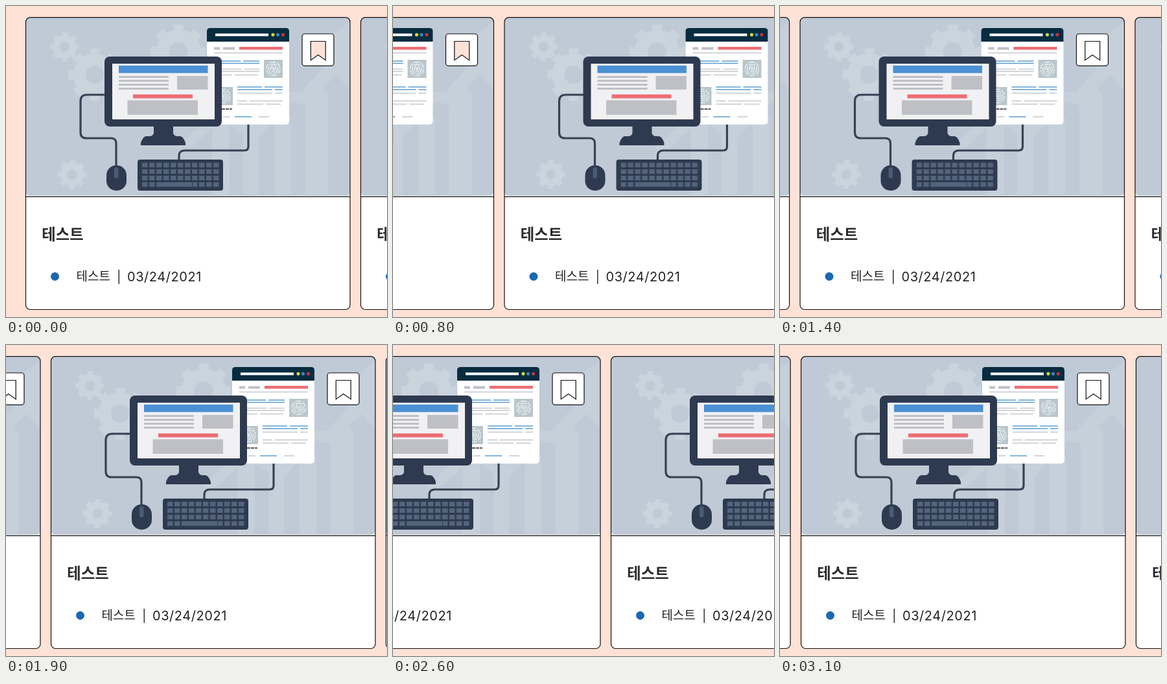
An HTML page that plays this animation: 588 by 480 pixels, repeating every 3.2 s.

```html
<!DOCTYPE html>
<html lang="ko">
<head>
<meta charset="utf-8">
<title>Card carousel</title>
<style>
  html, body { margin: 0; width: 100%; height: 100%; overflow: hidden; background: #ffe2d6; }
  svg { display: block; width: 588px; height: 480px; }
  text { font-family: "Noto Sans CJK KR", "Noto Sans CJK JP", "Noto Sans CJK", sans-serif; fill: #222; }
  .title { font-size: 23.3px; font-weight: 700; fill: #2b2b2e; }
  .author { font-size: 19px; font-weight: 300; }
  .date { font-family: Inter, sans-serif; font-size: 20px; letter-spacing: .55px; }
  .dark { fill: #2e3a50; }
  .grey { fill: #bec0c5; }
  .blue { fill: #4a90d4; }
  .red { fill: #ec6d73; }
  .cable { fill: none; stroke: #364153; stroke-width: 3.2; }
  .outline { stroke: #111; stroke-width: 1.2; }
</style>
</head>
<body>
<svg viewBox="0 0 588 480">
  <defs>
    <clipPath id="cardShape"><rect x="30.5" y="17.5" width="500.5" height="451" rx="7"/></clipPath>
    <clipPath id="imageShape"><rect x="30.5" y="10" width="500.5" height="282.8" rx="6"/></clipPath>
    <pattern id="keys" x="210" y="242" width="11" height="10" patternUnits="userSpaceOnUse">
      <rect width="8.5" height="7" fill="#53647b"/>
    </pattern>
    <g id="gear" fill="none" stroke="#cad4dd">
      <circle r="23.5" stroke-width="19"/>
      <circle r="35" stroke-width="11" stroke-dasharray="14 13.49" stroke-dashoffset="7"/>
    </g>
    <g id="fingerprint">
      <rect width="29" height="28" fill="#b9c6cc"/>
      <g fill="none" stroke="#edf2f3" stroke-width="1.4" transform="translate(14.5 14)">
        <circle r="10.5" stroke-dasharray="9 2"/><circle r="7.2" stroke-dasharray="12 2"/>
        <circle r="4" stroke-dasharray="8 2"/><circle r="1.2"/>
      </g>
    </g>

    <g id="backdrop" clip-path="url(#imageShape)">
      <rect x="30" y="17" width="502" height="277" fill="#bfcad6"/>
      <g fill="#c6d0da">
        <path d="M318 294V190L345 172V294ZM366 294V185L390 160V294ZM414 294V150L440 172V294ZM462 294V144L484 121L497 134V294Z"/>
        <path d="M262 220L330 156L385 190L436 132L456 133L494 90L473 68L531 24V130L510 106L462 152L442 148L386 208L332 176L284 220Z"/>
      </g>
      <use href="#gear" transform="translate(90.5 63) scale(.55)"/>
      <use href="#gear" transform="translate(137 106)"/>
      <use href="#gear" transform="translate(266 71) scale(1.05)"/>
      <use href="#gear" transform="translate(102 260) scale(.55)"/>
    </g>

    <g id="browser">
      <rect x="310" y="34" width="127" height="149" rx="5" fill="#fff"/>
      <path d="M310 55V39q0-5 5-5H432q5 0 5 5V55Z" fill="#072c40"/>
      <rect x="323" y="42.5" width="82" height="4" fill="#fff"/>
      <circle cx="412" cy="44.3" r="2.6" fill="#d5d83a"/>
      <circle cx="419.5" cy="44.3" r="2.6" fill="#3d83bd"/>
      <circle cx="427.5" cy="44.3" r="2.6" fill="#c8323b"/>
      <path class="grey" d="M321 63.5h9v4h-9zM335 63.5h18v4h-18z"/>
      <rect class="red" x="360" y="63" width="67" height="4.5"/>
      <g fill="none" stroke-width="1.5">
        <path stroke="#c5c8cc" d="M321 72.5H427M322 97.5H364M368 97.5H391M322 101H391M322 106.5H349M353 106.5H389M357 134.5H411M415 134.5H427M357 146.5H372M376 146.5H427M357 151.5H397M401 151.5H424M335 171H346M390 171H406"/>
        <path stroke="#5b9dd2" d="M322 85H362M366 85H391M322 88.5H391M357 125H395M399 125H427M357 129H411M415 129H427M353 171H379"/>
        <path stroke="#222" d="M333 159H349" stroke-dasharray="5 1"/>
      </g>
      <use href="#fingerprint" x="398" y="83"/>
      <use href="#fingerprint" x="321" y="125"/>
    </g>

    <g id="computer">
      <path class="cable" d="M154 137H125q-10 0-10 10V195q0 9 9 9H162q8 0 8 8V249M374 183V217q0 6-6 6H276q-9 0-9 8V238"/>
      <path class="dark" d="M228 184H258V196q1 5 7 5h4q4 0 8 10V215H208V211q4-10 8-10h5q6 0 7-5Z"/>
      <rect class="dark" x="152" y="78" width="181" height="108" rx="8"/>
      <rect x="164" y="89" width="158" height="86" fill="#f1f1f3"/>
      <rect class="blue" x="174" y="92" width="137.5" height="11.5"/>
      <path class="grey" d="M174 108h77v3h-77zM174 114h77v3h-77zM174 120h77v3h-77zM174 126h77v3h-77zM264 108h47.5v21H264zM187.5 145.5H296V168H187.5z"/>
      <rect class="red" x="196" y="136.5" width="92" height="6"/>
      <rect class="dark" x="155" y="246" width="31" height="39" rx="15"/>
      <rect x="167" y="249" width="6.5" height="17" rx="3.2" fill="#4b5b72"/>
      <rect class="dark" x="203" y="237" width="132" height="48" rx="4"/>
      <rect x="210" y="242" width="120" height="38" fill="url(#keys)"/>
      <rect class="dark" x="231" y="271" width="57" height="9"/>
      <rect x="232" y="272" width="55" height="7" fill="#53647b"/>
    </g>

    <g id="card">
      <g clip-path="url(#cardShape)">
        <rect x="30" y="17" width="502" height="452" fill="#fff"/>
        <use href="#backdrop"/>
        <use href="#browser"/>
        <use href="#computer"/>
        <path class="outline" d="M30 294.3H532"/>
      </g>
      <rect class="outline" x="30.5" y="17.7" width="500.5" height="450.8" rx="7" fill="none"/>
      <rect class="outline" x="457" y="43" width="49" height="49.3" rx="4" fill="#fff"/>
      <path class="outline" d="M470.3 54.5H493.2V83.7L481.7 75.5L470.3 83.7Z" style="fill: var(--mark, #fff)"/>
      <text class="title" x="55.3" y="361">테스트</text>
      <circle cx="75.5" cy="417.5" r="6.5" fill="#1b68b0"/>
      <text class="author" x="108.5" y="424">테스트</text>
      <path d="M174.3 407V429" stroke="#222" stroke-width="1.4"/>
      <text class="date" x="187" y="424.5">03/24/2021</text>
    </g>
  </defs>
  <rect width="588" height="480" fill="#ffe2d6"/>
  <g id="track"></g>
</svg>
<script>
  const LOOP = 3200, STEP = 100, PITCH = 517, DECAY = 101;
  const swipes = [669, 1639, 2547];
  const track = document.getElementById('track');

  // Only the first card is bookmarked.
  track.innerHTML = [0, 1, 2, 3, 4].map(i =>
    `<use href="#card" x="${i * PITCH}" ${i ? '' : 'style="--mark:#ffe2d6"'}/>`).join('');

  // Each swipe starts fast and settles exponentially on the next card.
  const scrollAt = time => swipes.reduce((sum, start) =>
    sum + (time > start ? PITCH * (1 - Math.exp((start - time) / DECAY)) : 0), 0);

  // The picture advances ten times a second.
  function draw() {
    const time = Math.floor(performance.now() % LOOP / STEP) * STEP;
    const x = Math.round(scrollAt(time) * 2) / 2;
    track.setAttribute('transform', `translate(${-x} 0)`);
    requestAnimationFrame(draw);
  }
  draw();
</script>
</body>
</html>
```
